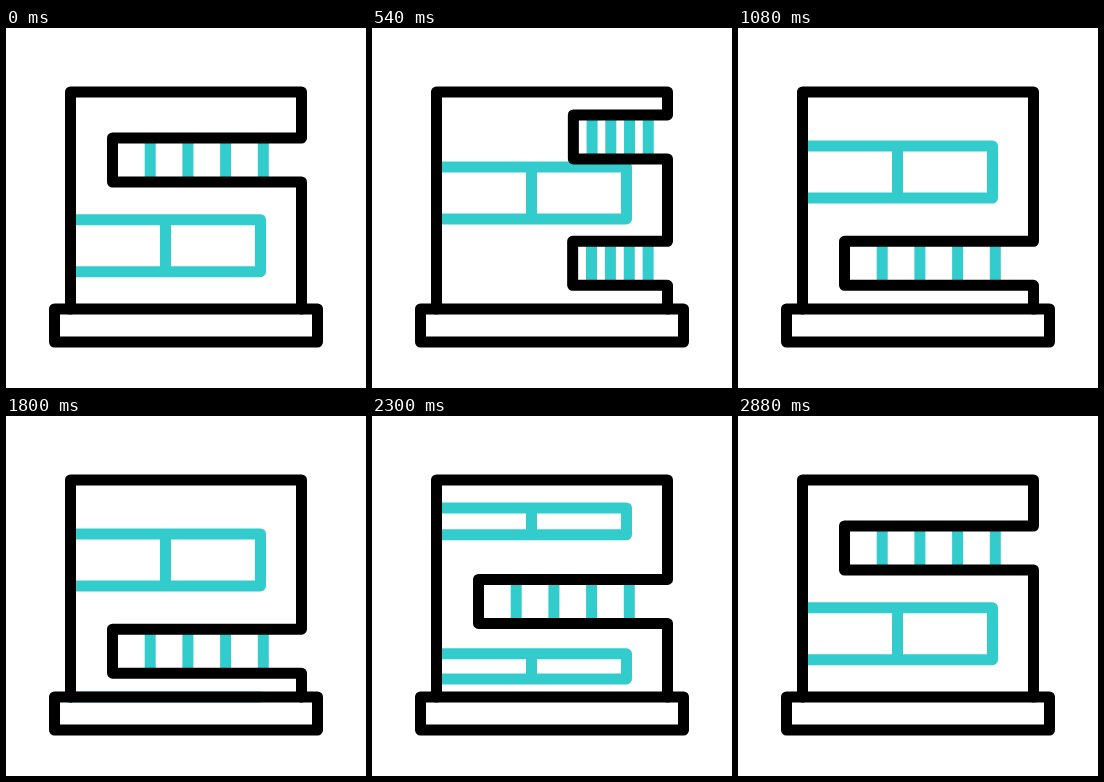
Write an HTML page that moves like this. It is 360 px wide and 360 px high and loops after 3.6 s.

```html
<!DOCTYPE html>
<html lang="en">
<head>
<meta charset="utf-8">
<title>Building</title>
<style>
  html, body { margin: 0; width: 100%; height: 100%; overflow: hidden; background: #fff; }
  svg { display: block; width: 100vw; height: 100vh; }
  path { fill: none; stroke-width: 11; stroke-linejoin: round; stroke-linecap: round; }
  .teal { stroke: #33cccc; }
  .bars { stroke-linecap: butt; }
  .ink { stroke: #000; }
</style>
</head>
<body>
<svg viewBox="0 0 360 360">
  <path class="teal" id="windows"/>
  <path class="teal bars" id="bars"/>
  <path class="ink" id="outline"/>
  <path class="ink" d="M48.5 281H311.5V314H48.5Z"/>
</svg>
<script>
const LOOP = 3600;
const LEFT = 64.5, RIGHT = 295.5, ROOF = 64, FLOOR = 281;
const SLOT_LEFT = 106.5, SLOT_HEIGHT = 44;
const HIGH_SLOT = 110, LOW_SLOT = 213.3;
const HIGH_WINDOW = 118, LOW_WINDOW = 191.7, WINDOW_HEIGHT = 52;

const el = id => document.getElementById(id);
const mix = (a, b, p) => a + (b - a) * p;

// cubic-bezier(.5, 0, .5, 1), solved by bisection
function ease(x) {
  if (x <= 0) return 0;
  if (x >= 1) return 1;
  let lo = 0, hi = 1;
  for (let i = 0; i < 24; i++) {
    const u = (lo + hi) / 2;
    if (1.5 * u * (1 - u) + u * u * u < x) lo = u; else hi = u;
  }
  return lo * lo * (3 - 2 * lo);
}

const progress = (t, start, length) => ease((t - start) / length);

function scene(t) {
  if (t < 1400) {
    // The upper slot slides out while the lower one opens
    const p = progress(t, 0, 1080);
    const top = mix(LOW_WINDOW, HIGH_WINDOW, progress(t, 0, 880));
    return {
      slots: [
        { x: mix(SLOT_LEFT, RIGHT, p), y: mix(HIGH_SLOT, ROOF, p) },
        { x: mix(RIGHT, SLOT_LEFT, p), y: LOW_SLOT }
      ],
      windows: [[top, top + WINDOW_HEIGHT]]
    };
  }
  // The slot rises, folding one window into the roof and unfolding another
  const p = progress(t, 1775, 1070);
  const windows = [];
  if (p < 1) {
    windows.push([mix(HIGH_WINDOW, ROOF, p), mix(HIGH_WINDOW + WINDOW_HEIGHT, ROOF, p)]);
  }
  if (p > 0) {
    windows.push([mix(FLOOR, LOW_WINDOW, p), mix(FLOOR, LOW_WINDOW + WINDOW_HEIGHT, p)]);
  }
  return { slots: [{ x: SLOT_LEFT, y: mix(LOW_SLOT, HIGH_SLOT, p) }], windows };
}

function barPath({ x, y }) {
  let d = "";
  for (let k = 1; k < 5; k++) {
    d += `M${mix(x, 295, k / 5)} ${y}v${SLOT_HEIGHT}`;
  }
  return d;
}

function draw(t) {
  const { slots, windows } = scene(t);
  const open = slots.filter(s => s.x < RIGHT - 0.5);
  el("windows").setAttribute("d", windows.map(([a, b]) =>
    `M${LEFT} ${a}H254.5V${b}H${LEFT}M159.5 ${a}V${b}`).join(""));
  el("bars").setAttribute("d", open.map(barPath).join(""));
  el("outline").setAttribute("d", `M${LEFT} ${FLOOR}V${ROOF}H${RIGHT}` +
    open.map(({ x, y }) => `V${y}H${x}v${SLOT_HEIGHT}H${RIGHT}`).join("") + `V${FLOOR}`);
}

const start = performance.now();
function tick() {
  draw((performance.now() - start) % LOOP);
  requestAnimationFrame(tick);
}
tick();
</script>
</body>
</html>
```
